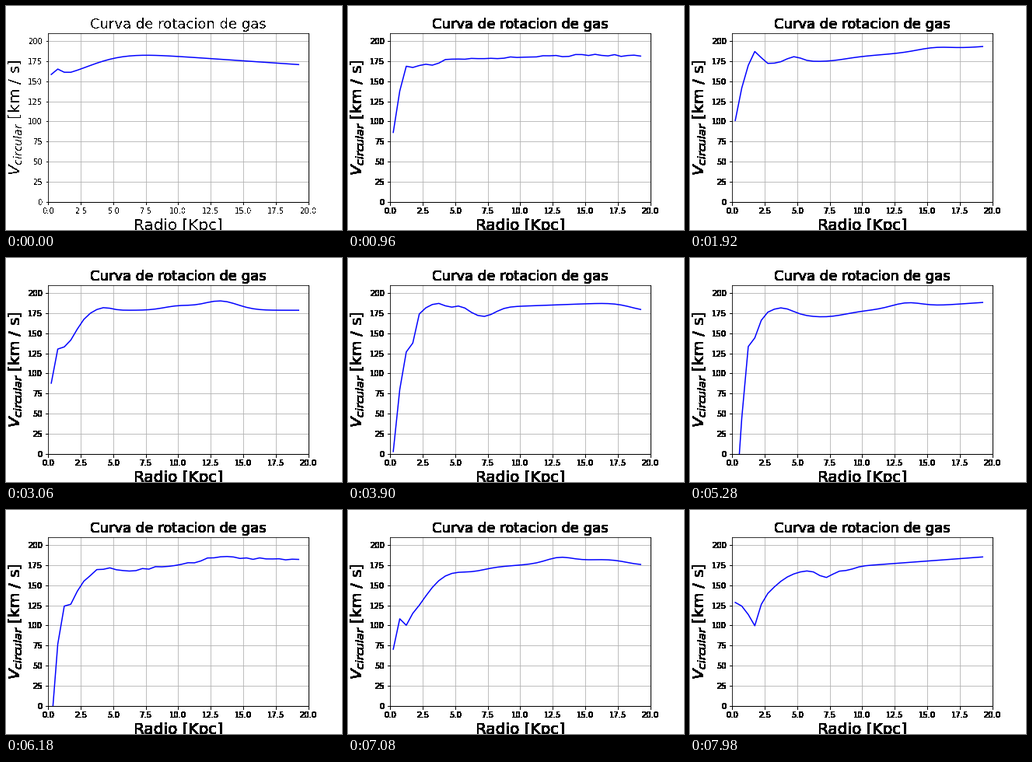
A matplotlib script that plays this animation: 432 px wide and 288 px high, repeating every 8000 ms.

```python
import numpy as np
import matplotlib.pyplot as plt
from matplotlib.animation import FuncAnimation

STEP_TICKS = 3          # 20 ms ticks per drawn step
TICKS = 400

radius = 0.25 + 0.5 * np.arange(39)


def curve(level, slope, *bumps):
    """Straight trend plus Gaussian bumps given as (centre, height, width)."""
    v = level + slope * radius
    for centre, height, width in bumps:
        v = v + height * np.exp(-((radius - centre) / width) ** 2)
    return v


# step at which the disc passes through each shape
poses = {
    0: curve(191.8, -1.1, (0, -34.4, 4.16), (0.8, 7.5, 0.4)),
    32: curve(168, 1.3, (0, -75, 0.75), (1.82, 17.3, 0.5), (4.75, 6.5, 0.8),
              (7.5, -2.5, 1.8), (15.5, 3.6, 1.8)),
    51: curve(178.5, 0, (0, -80, 0.45), (1.1, -46, 1.4), (4.3, 3.5, 0.8),
              (10, 5, 1.6), (13.2, 11.5, 1.9)),
    65: curve(177.5, 0.6, (0, -188, 0.92), (1.6, -40, 0.45), (3.6, 7.5, 0.8),
              (5.4, 4, 0.6), (7.2, -11, 1.2), (20, -11, 2)),
    88: curve(167, 1.1, (0, -264, 0.86), (1.8, -22, 0.4), (3.7, 10.5, 1.3),
              (7.4, -4.5, 2), (13.4, 6, 1.6)),
    118: curve(163, 1.2, (0, -86, 0.3), (1, -56, 2.2), (1.25, -9, 0.25),
               (6.3, -3.5, 1.4), (13, 6, 1.4), (19.8, -11, 2.2)),
    133: curve(162, 1.2, (1.2, -40, 2.3), (1.7, -27, 0.45),
               (7.2, -11, 0.8), (8.8, -4, 0.8)),
}
steps = list(poses)

# the inner disc flickers most
rng = np.random.default_rng(4)
phase = rng.uniform(0, 2 * np.pi, radius.size)
rate = rng.uniform(0.25, 0.5, radius.size)
swing = 45 * np.exp(-radius / 0.8) + 1


def speed(step):
    k = min(np.searchsorted(steps, step, "right"), len(steps) - 1)
    start, end = steps[k - 1], steps[k]
    u = (step - start) / (end - start)
    ease = u * u * (3 - 2 * u)
    base = poses[start] + (poses[end] - poses[start]) * ease
    jitter = swing * (np.sin(rate * step + phase) - 0.3)
    return base + np.sin(np.pi * u) * jitter


def hard_edges(cut):
    """Filter that turns pixels with more alpha than cut solid, others clear."""
    def apply(img, dpi):
        img = img.copy()
        img[..., 3] = img[..., 3] > cut
        return img, 0, 0
    return apply


thin, bold = hard_edges(0.5), hard_edges(0)

plt.rcParams.update({"font.family": "DejaVu Sans", "font.size": 10})
fig, ax = plt.subplots(figsize=(6, 4), dpi=72)
fig.subplots_adjust(left=0.125, right=0.9, bottom=0.125, top=0.88)
ax.set(xlim=(0, 20), ylim=(0, 210),
       xticks=np.arange(0, 20.1, 2.5), yticks=np.arange(0, 201, 25))
title = ax.set_title("Curva de rotacion de gas", fontsize=18)
ax.set_xlabel("Radio [Kpc]", fontsize=20)
ax.set_ylabel("$V_{circular}$ [km / s]", fontsize=20)
for side in ("right", "bottom"):
    ax.spines[side].set_linewidth(1)

grid = dict(color="#b0b0b0", lw=0.8, zorder=1)
for x in ax.get_xticks():
    ax.axvline(x, **grid)
for y in ax.get_yticks():
    ax.axhline(y, **grid)
line, = ax.plot(radius, speed(0), color="blue", lw=1.5)


def update(tick):
    step = tick // STEP_TICKS
    line.set_ydata(speed(step))
    for part in (title, ax.xaxis, ax.yaxis):
        part.set_agg_filter(bold if step else thin)
    return line,


def init():
    return update(0)


anim = FuncAnimation(fig, update, frames=TICKS, init_func=init,
                     interval=20, repeat=True, repeat_delay=0, blit=False)
plt.show()
```
